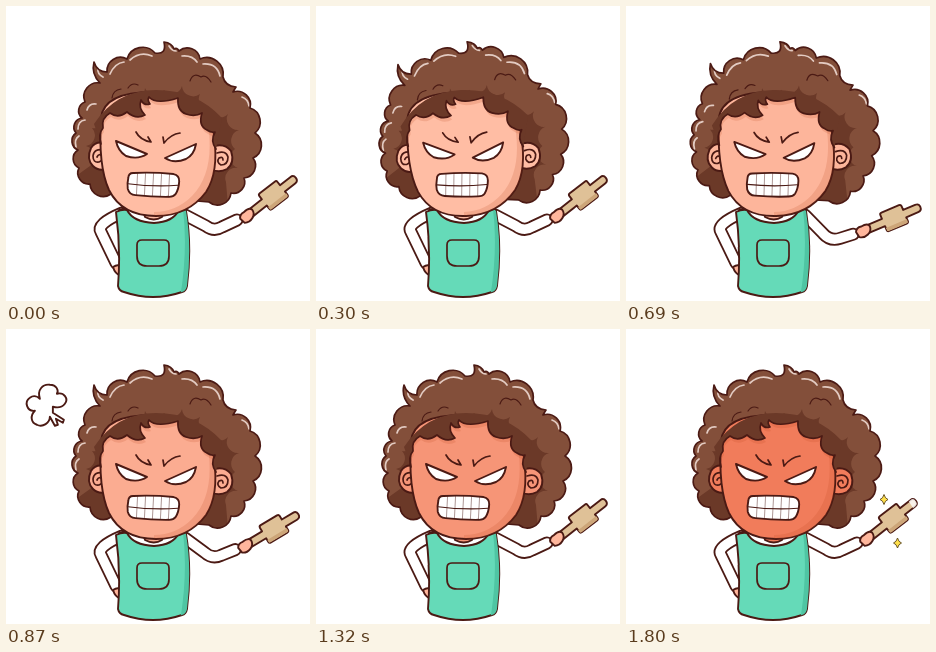
These frames come from a looping animation (304x295 px, 1830 ms). An HTML page:

```html
<!DOCTYPE html>
<html lang="en">
<head>
<meta charset="utf-8">
<title>Angry cook</title>
<style>
  html, body { margin: 0; width: 100%; height: 100%; overflow: hidden; background: #fff; }
  svg { display: block; width: 100vw; height: 100vh; }
  .line { fill: none; stroke: #4b1a14; stroke-width: 1.7; stroke-linecap: round; stroke-linejoin: round; }
  .shape { stroke: #4b1a14; stroke-width: 1.9; stroke-linejoin: round; }
  .hair { fill: #834f3a; }
  .under { fill: #6b3928; }
  .shine { fill: none; stroke: #e3cbc2; stroke-width: 1.7; stroke-linecap: round; }
  .shade { fill: #b5401c; opacity: .17; }
  .teeth { stroke-width: 1; opacity: .45; }
  .hand { fill: #ffb69c; }
  .wood { fill: #dfc197; }
  .limb { fill: none; stroke-linecap: round; stroke-linejoin: round; }
  .cuff { stroke: #4b1a14; stroke-width: 13; }
  .sleeve { stroke: #fff; stroke-width: 9.4; }
  .star { fill: #ffe04d; stroke: #5b4515; stroke-width: .9; }
</style>
</head>
<body>
<svg viewBox="0 0 304 295">
  <defs>
    <clipPath id="hairClip"><path class="hairPath"/></clipPath>
    <clipPath id="faceClip"><path class="facePath"/></clipPath>
    <clipPath id="apronClip"><path class="apronPath"/></clipPath>
    <clipPath id="pinClip"><path class="pinPath"/></clipPath>
  </defs>

  <g id="puff">
    <path class="shape" fill="#fff" d="M-10 -9 L1 -2 L0 1 L-7 -3 L-5 3 L-8 4 L-13 -5
      C-13 1 -20 6 -26 3 C-32 1 -33 -6 -28 -11 C-36 -10 -39 -20 -33 -24 C-29 -27 -25 -25 -23 -23
      C-26 -32 -20 -38 -13 -37 C-6 -37 -4 -31 -6 -28 C1 -30 6 -23 2 -18 C-1 -14 -6 -14 -10 -15 Z"/>
  </g>

  <path class="limb cuff" d="M116 207 Q90 218 95 226 L110 257"/>
  <path class="limb sleeve" d="M116 207 Q90 218 95 226 L110 257"/>
  <path class="shape hand" d="M107 261 Q113 257 116 262 L115 270 Q109 268 107 261"/>
  <path class="limb cuff arm"/>
  <path class="limb sleeve arm"/>

  <path class="shape" fill="#fff" d="M113 204 Q148 192 180 204 L178 222 H115 Z"/>
  <path class="shape apronPath" fill="#65dab8"/>
  <g clip-path="url(#apronClip)">
    <path fill="#4fc5a3" d="M177 203 Q182 245 174 292 L190 290 V203 Z"/>
  </g>
  <path class="line" d="M136 234 H158 Q163 234 163 239 V250 Q163 260 153 260 H141 Q131 260 131 250 V239 Q131 234 136 234 Z"/>
  <path class="shape skin" d="M137 204 L139 211 Q148 216 156 211 L159 204 Z"/>

  <g id="pin">
    <path class="shape wood pinPath"/>
    <g clip-path="url(#pinClip)">
      <path fill="#cda679" d="M22 6 H45 V12 H22 Z"/>
      <path id="gleam" fill="#fff" opacity=".8" d="M-3 -14 H3 L0 14 H-6 Z"/>
    </g>
  </g>
  <path id="fist" class="shape hand" d="M-7 -2 Q-5 -6 0 -5 Q7 -6 8 -2 Q8 3 3 5 Q-2 7 -6 4 Z"/>
  <path class="star" id="starA"/>
  <path class="star" id="starB"/>

  <g id="head">
    <path class="hair hairPath"/>
    <g clip-path="url(#hairClip)">
      <path class="under underPath"/>
      <path class="shine" d="M92 62 Q91 68 97 71 M104 68 Q109 57 118 56 M124 54 Q134 45 146 50 M163 40 Q166 45 170 45
        M176 50 Q186 49 191 56 M197 58 Q211 57 214 70 M81 104 Q83 97 90 98 M72 123 Q72 115 79 114
        M70 141 Q68 133 73 130 M236 91 Q242 93 243 100"/>
    </g>
    <path class="line hairPath"/>
    <path class="line" style="stroke-width:1.2" d="M184 75 Q187 66 195 71 Q200 68 205 76 M106 92 Q107 84 115 83 M122 82 Q126 76 132 79"/>
    <g class="shape skin">
      <path d="M103 139 Q91 133 85 142 Q80 153 87 160 Q94 167 105 161 Z"/>
      <path d="M205 141 Q218 136 225 145 Q229 157 221 163 Q212 168 203 162 Z"/>
    </g>
    <path class="line" d="M98 144 Q88 142 87 150 Q87 157 93 156 Q98 154 96 150 Q93 147 91 151
      M211 147 Q220 144 222 151 Q222 159 215 159 Q210 156 213 152 Q217 150 217 154"/>
    <path class="shape skin facePath"/>
    <g clip-path="url(#faceClip)">
      <path class="shade" d="M191 100 Q195 122 203 127 Q207 168 186 190 Q170 206 148 206 V215 H220 V100 Z"/>
      <path class="shade fringePath" transform="translate(1 4)"/>
    </g>
    <path class="under fringePath"/>
    <path class="line fringeEdge"/>

    <path class="line" d="M130 126 Q134 134 145 136 L142 131 M174 127 Q165 128 158 137 L157 131"/>
    <path class="shape" fill="#fff" d="M110 135 L141 148 Q132 154 120 150 Q112 145 110 135 Z"/>
    <path class="shape" fill="#fff" d="M190 138 L159 152 Q168 158 180 153 Q188 149 190 138 Z"/>
    <g transform="rotate(3 147 178.500)">
      <path class="shape" fill="#fff" d="M127 168 Q147 166 167 167 Q173 168 173 174 Q173 182 170 187 Q168 190 163 190 Q147 191 130 190 Q124 190 122 184 Q121 179 122 173 Q122 168 127 168 Z"/>
      <path class="line" style="stroke-width:1.100" d="M122 179 Q147 181 172 178"/>
      <path class="line teeth" d="M131 168 V190 M139 167.500 V190 M147 167 V190.500 M155 167 V190 M163 167.500 V190"/>
    </g>
  </g>
</svg>

<script>
const LOOP = 1830;
const $ = id => document.getElementById(id);
const each = (selector, name, value) =>
  document.querySelectorAll(selector).forEach(el => el.setAttribute(name, value));
const clamp = x => Math.min(1, Math.max(0, x));
const mix = (a, b, p) => a + (b - a) * p;
const swing = (t, period, end) => t < end ? (1 - Math.cos(2 * Math.PI * t / period)) / 2 : 0;

// Chain of round curls; sweep 1 bulges outward, 0 inward.
function curls(points, sweep = 1) {
  let [x, y] = points[0];
  return points.slice(1).map(([nx, ny]) => {
    const r = (Math.hypot(nx - x, ny - y) * 0.57).toFixed(1);
    [x, y] = [nx, ny];
    return `A${r} ${r} 0 0 ${sweep} ${nx} ${ny}`;
  }).join(' ');
}

const hair = 'M94 77 Q85 68 88 56 Q91 66 101 66 ' +
  curls([[101, 66], [121, 53], [149, 47]]) +
  ' Q161 49 158 36 Q166 37 168 43 Q171 41 173 45 ' +
  curls([[173, 45], [194, 53], [217, 71]]) +
  ' Q219 80 230 81 Q228 84 227 86 ' +
  curls([[227, 86], [244, 102], [249, 127], [247, 152], [238, 172], [225, 187], [203, 196]]) +
  ' L105 188 ' +
  curls([[105, 188], [84, 178], [73, 162], [72, 144], [70, 127], [76, 112], [79, 96], [94, 77]]) + ' Z';

const under = 'M70 170 L84 160 ' +
  curls([[84, 160], [80, 140], [86, 122], [99, 107], [106, 94], [121, 91], [139, 82], [158, 84],
    [176, 80], [194, 88], [204, 103], [222, 108], [233, 124], [229, 143], [232, 162], [220, 176]], 0) +
  ' L222 200 H90 Z';

const face = 'M95 112 Q98 85 150 86 Q206 88 208 130 Q213 166 200 186 Q182 210 150 210 Q116 210 103 184 Q92 160 95 112 Z';

const fringe = 'M95 138 Q92 128 97 122 Q95 112 104 107 Q112 113 121 106 Q130 114 139 109 ' +
  'Q132 102 135 94 Q138 100 144 98 Q141 94 143 91 Q150 99 172 92 Q171 105 180 108 ' +
  'Q189 111 196 107 Q192 120 201 124 Q205 127 209 126 Q204 135 210 143';

const pin = 'M4 -4 H22 V-8 Q22 -10 24 -10 H43 Q45 -10 45 -8 V-4 H58 Q62 -4 62 0 Q62 4 58 4 ' +
  'H45 V8 Q45 10 43 10 H24 Q22 10 22 8 V4 H4 Z';

const apron = 'M110 206 Q116 203 121 204 Q127 216 148 217 Q167 216 173 204 Q178 202 180 205 ' +
  'Q186 240 181 280 Q180 285 176 286 Q147 296 118 286 Q113 285 112 280 Q115 243 110 206 Z';

each('.hairPath', 'd', hair);
each('.underPath', 'd', under);
each('.facePath', 'd', face);
each('.fringePath', 'd', fringe + ' L216 112 Q190 84 150 84 Q110 84 88 118 Z');
each('.fringeEdge', 'd', fringe);
each('.pinPath', 'd', pin);
each('.apronPath', 'd', apron);
each('.star', 'd', 'M0 -5 Q1 -1 4 0 Q1 1 0 5 Q-1 1 -4 0 Q-1 -1 0 -5 Z');

const CALM = [255, 189, 164], FURIOUS = [241, 124, 91];

function skinColor(t) {
  const anger = clamp((t - 540) / 1260);
  return `rgb(${CALM.map((c, i) => Math.round(mix(c, FURIOUS[i], anger)))})`;
}

function drawPuff(t) {
  const start = t < 1200 ? 735 : 1340;
  const p = (t - start) / 265;
  const visible = p >= 0 && p <= 1;
  $('puff').setAttribute('visibility', visible ? 'visible' : 'hidden');
  if (!visible) return;
  const size = mix(.3, 1, clamp(p / .5));
  $('puff').setAttribute('transform',
    `translate(${mix(71.5, 43, p)} ${mix(141, 47, p)}) scale(${size})`);
}

function drawArm(t) {
  const drop = swing(t, 151, 1208);
  const x = mix(241, 237, drop), y = mix(210, 226, drop);
  const angle = mix(-38, -22, drop);
  each('.arm', 'd', `M179 209 L${mix(200, 197, drop)} ${mix(220, 228, drop)}
    Q${mix(208, 204, drop)} ${mix(226, 236, drop)} ${mix(216, 214, drop)} ${mix(221, 233, drop)}
    L${x - 10} ${mix(214, 229, drop)}`);
  each('#pin, #fist', 'transform', `translate(${x} ${y}) rotate(${angle})`);
  $('gleam').setAttribute('transform', `translate(${mix(-10, 60, (t - 1470) / 330)} 0)`);
  $('gleam').setAttribute('visibility', t > 1470 ? 'visible' : 'hidden');
}

function drawStars(t) {
  const grow = start => clamp((t - start) / 120);
  $('starA').setAttribute('transform', `translate(258 170.500) scale(${grow(1650)})`);
  $('starB').setAttribute('transform', `translate(271.500 214) scale(${grow(1500)})`);
}

function draw(t) {
  $('head').setAttribute('transform', `rotate(${-7.2 * swing(t, 372, 744)} 150 208)`);
  each('.skin', 'fill', skinColor(t));
  drawPuff(t);
  drawArm(t);
  drawStars(t);
}

const begin = performance.now();
function tick() {
  draw((performance.now() - begin) % LOOP);
  requestAnimationFrame(tick);
}
draw(0);
requestAnimationFrame(tick);
</script>
</body>
</html>
```
